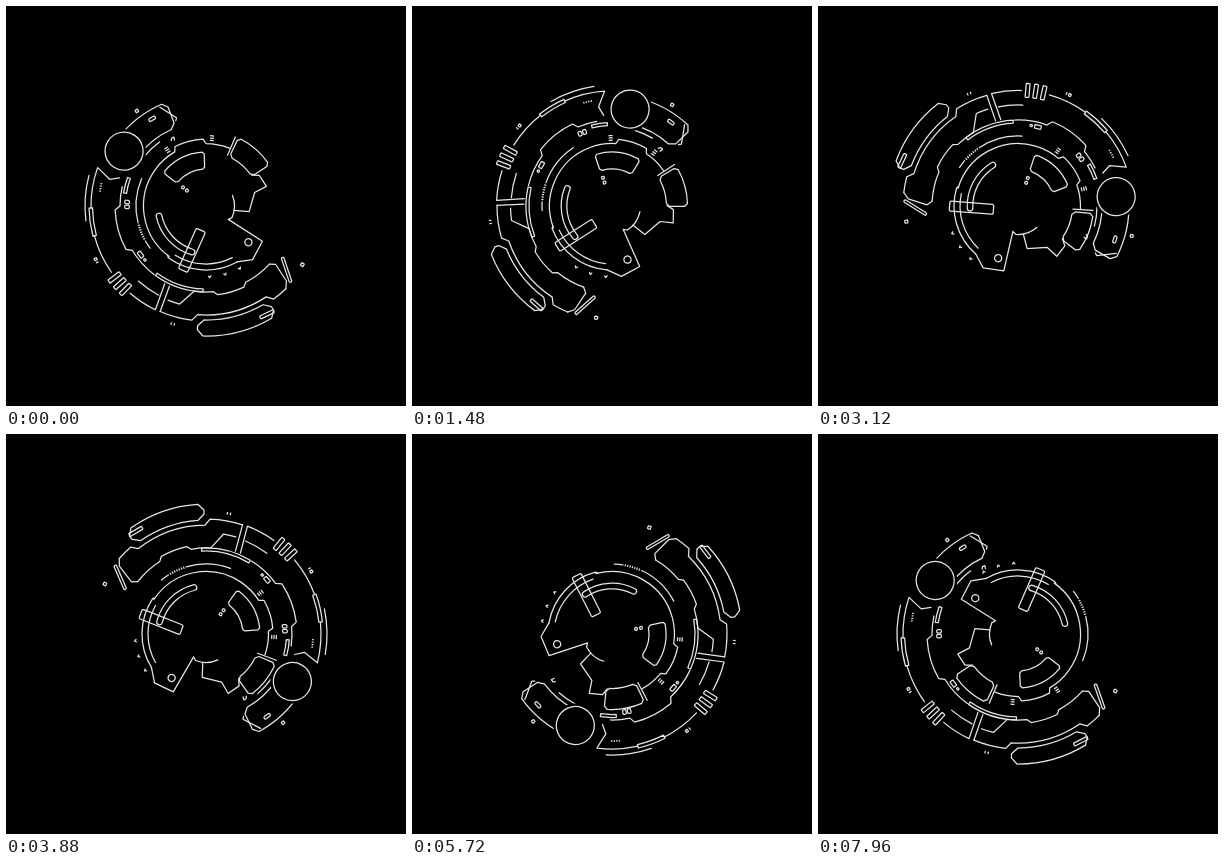
These frames come from a looping animation (400x400 px, 8000 ms). An HTML page with a canvas:

```html
<!DOCTYPE html>
<html lang="en">
<head>
<meta charset="utf-8">
<title>Rotating dial</title>
<style>
  html, body { margin: 0; width: 100%; height: 100%; overflow: hidden; background: #000; }
  canvas { display: block; width: 100vmin; height: 100vmin; }
</style>
</head>
<body>
<canvas id="stage" width="400" height="400"></canvas>
<script>
const ctx = document.getElementById('stage').getContext('2d');
const LOOP = 8000, STEP = 40;
const OUTER_SPEED = 45.11, INNER_SPEED = 22.55; // degrees per second
const rad = deg => deg * Math.PI / 180;

// Joins [radius, angle] points; equal radii are joined by an arc.
function path(points, closed = false) {
  ctx.beginPath();
  points.forEach(([r, deg], i) => {
    const a = rad(deg), [prevR, prevDeg] = points[i - 1] || [];
    if (r === prevR) ctx.arc(0, 0, r, rad(prevDeg), a, deg < prevDeg);
    else ctx.lineTo(r * Math.cos(a), r * Math.sin(a));
  });
  if (closed) ctx.closePath();
  ctx.stroke();
}
const line = (...points) => path(points);
const arc = (r, a0, a1) => line([r, a0], [r, a1]);
const spoke = (r0, r1, a) => line([r0, a], [r1, a]);

// Sector of a ring with its corners cut by c pixels.
function plate(r0, r1, a0, a1, c = 0) {
  const i = c / rad(r0), o = c / rad(r1);
  path([[r0, a0 + i], [r0, a1 - i], [r0 + c, a1], [r1 - c, a1],
        [r1, a1 - o], [r1, a0 + o], [r1 - c, a0], [r0 + c, a0]], true);
}

// Arc from a0 to a1 that is raised by h between b0 and b1.
function steppedArc(r, a0, a1, b0, b1, h) {
  const ramp = 2.5 * Math.sign(a1 - a0);
  line([r, a0], [r, b0], [r + h, b0 + ramp], [r + h, b1 - ramp], [r, b1], [r, a1]);
}

// Runs a drawing at a polar place: x points outward, y along the turn.
function at(r, a, draw) {
  ctx.save();
  ctx.rotate(rad(a));
  ctx.translate(r, 0);
  draw();
  ctx.restore();
}
const box = (r, a, w, h, round = 0.6, tilt = 0) => at(r, a, () => {
  ctx.rotate(rad(tilt));
  ctx.beginPath();
  ctx.roundRect(-w / 2, -h / 2, w, h, round);
  ctx.stroke();
});
const disc = (r, a, size, gap = 0) => at(r, a, () => {
  ctx.beginPath();
  ctx.arc(0, 0, size + gap, 0, 2 * Math.PI);
  ctx.fill();
  ctx.beginPath();
  ctx.arc(0, 0, size, 0, 2 * Math.PI);
  ctx.stroke();
});
function repeat(n, start, gap, draw) {
  for (let i = 0; i < n; i++) draw(start + i * gap);
}

function drawHead() {
  plate(84, 111, 214, 249, 5);
  arc(79, 220, 234);
  disc(98.6, 213.8, 19, 3);
  line([109, 245], [93, 251.5], [90.5, 250.5]);
  box(102.5, 238.3, 3, 7, 1.2);
  box(117.6, 234, 2.8, 2.8);
  line([74, 242], [76, 243], [76, 245], [73, 244.5]);
}

function drawLeftBand() {
  line([91, 198], [100, 195.5], [115, 199.5], [115, 179]);
  plate(113.5, 117, 165, 179);
  arc(115.5, 165, 145);
  arc(121, 194.7, 173);
  repeat(4, 188, 1.35, a => spoke(106.6, 107.4, a));
  repeat(3, 134, 4, a => box(116, a, 14, 3.8));
  line([101, 132], [101, 118]);
  line([115.5, 131], [115.5, 116], [88, 118]);
  box(122.5, 154.3, 2.6, 2.4);
  spoke(121.5, 123.5, 152.6);
  repeat(2, 105, 1.5, a => spoke(121.8, 123.4, a));
}

function drawMiddleBand() {
  steppedArc(86, 193, 127, 180, 149, 5);
  plate(80.5, 83.5, 189, 200);
  plate(83, 86, 92, 126);
  repeat(2, 179.4, 3.5, a => box(79, a, 4.6, 3.4, 1.2));
  box(81.5, 143.4, 3.6, 6.5);
  box(81.5, 138.6, 2, 2.2);
}

function drawRightBand() {
  line([88, 114.5], [115, 113.5]);
  steppedArc(115, 113.5, 46, 97, 54, -6);
  line([115, 46], [110, 43], [91, 40], [86, 42.5]);
  steppedArc(86, 42.5, 98, 62.5, 85, 3.5);
  line([86, 98], [101.5, 105], [101.5, 112]);
  box(102.8, 38.4, 26, 2.6, 1, 33);
  plate(114, 130, 57, 94, 6);
  box(124.3, 60.6, 3.2, 15, 0.8, 4);
  box(112.8, 31.3, 3, 3);
}

function drawInnerRing() {
  steppedArc(62.5, 126, 292, 240, 270, 4.5);
  line([64, 61], [64, 126], [62.5, 128]);
  arc(58, 63, 122);
  arc(70, 143, 150);
  repeat(7, 152, 2, a => spoke(69.3, 70.5, a));
  arc(70, 166, 203);
  repeat(2, 235.5, 39.5, a => repeat(3, 65.8, 2.3, r => arc(r, a - 1.3, a + 1.3)));
  repeat(3, 61.6, 12.7, a => line([70, a - 1], [71.8, a], [70.2, a + 1]));
}

function drawSlot(r, half, from, to) {
  const end = (deg, turn) =>
    ctx.arc(r * Math.cos(deg), r * Math.sin(deg), half, deg + turn, deg + turn + Math.PI);
  ctx.beginPath();
  ctx.arc(0, 0, r + half, from, to);
  end(to, 0);
  ctx.arc(0, 0, r - half, to, from, true);
  end(from, Math.PI);
  ctx.stroke();
}

function drawInnerParts() {
  // Arm with a pivot hole, and the jagged plate beside it.
  line([64, 61], [71, 49], [66.5, 32], [26, 31], [28.5, 24], [28.5, -22]);
  disc(55.8, 40.5, 3.6);
  line([28.5, 9], [43.5, 7.5], [50.5, -15.5], [63.5, -18], [61.5, -30], [55, -34]);

  plate(54.5, 75.5, -64.5, -33, 3);
  spoke(55, 75, -67);
  plate(37, 54, 218, 268, 2);
  repeat(2, 24.6, 5, r => box(r, 219, 2.7, 2.7, 1));
  drawSlot(48, 2.8, rad(107), rad(168));
  box(46.5, 107.6, 44, 10, 1.5, 6.5);
}

function turned(deg, ...parts) {
  ctx.save();
  ctx.translate(200, 200);
  ctx.rotate(rad(deg));
  parts.forEach(part => part());
  ctx.restore();
}

function frame(now) {
  const t = Math.floor((now % LOOP) / STEP) * STEP / 1000;
  ctx.fillStyle = '#000';
  ctx.fillRect(0, 0, 400, 400);
  ctx.strokeStyle = '#e6e6e6';
  ctx.lineWidth = 1.25;
  ctx.lineJoin = ctx.lineCap = 'round';
  turned(OUTER_SPEED * t, drawHead, drawLeftBand, drawMiddleBand, drawRightBand);
  turned(INNER_SPEED * t, drawInnerRing, drawInnerParts);
  requestAnimationFrame(frame);
}
frame(0);
</script>
</body>
</html>
```
